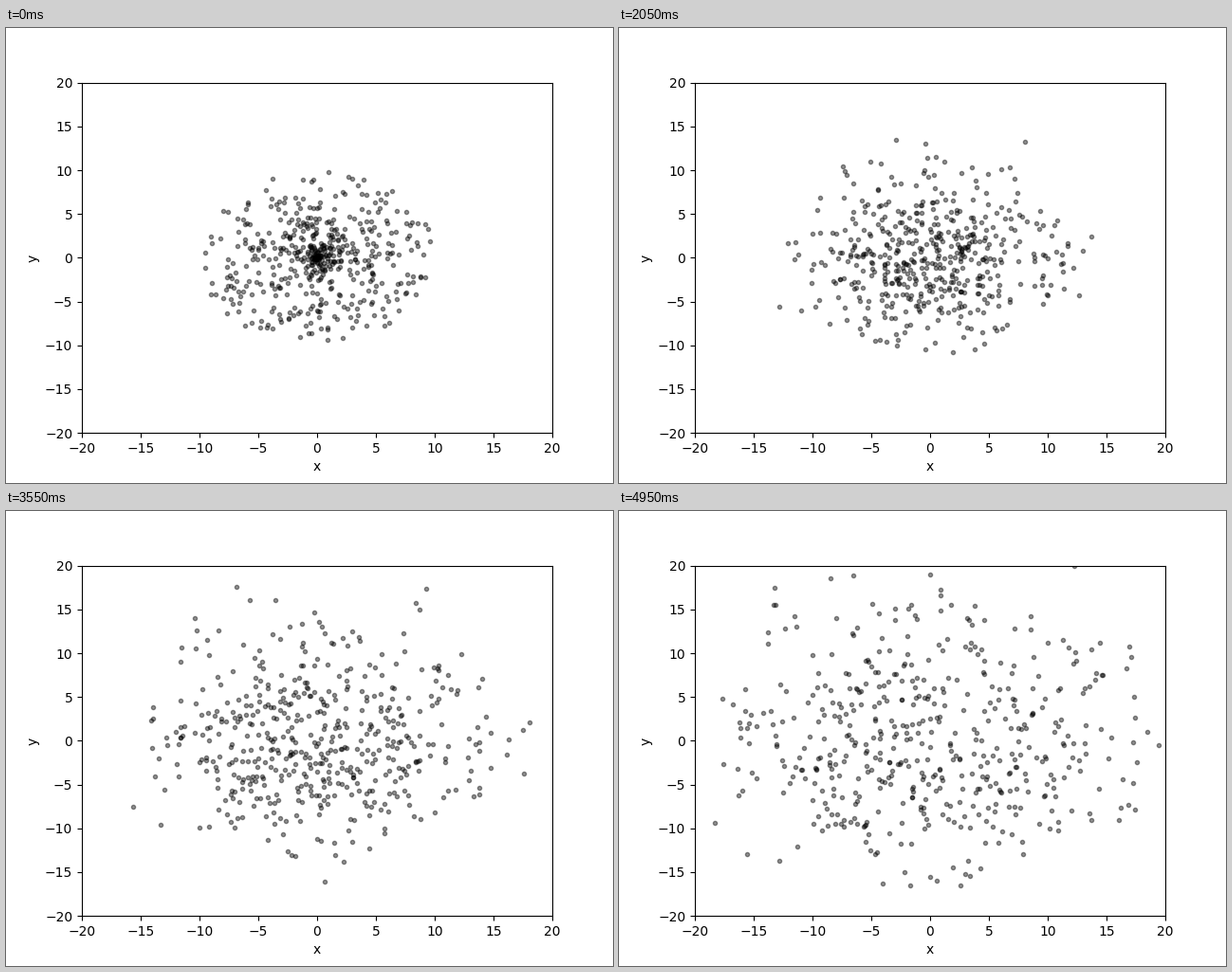
Write a matplotlib script that moves like this. It is 640x480 px and loops after 5000 ms.

```python
import numpy as np
import matplotlib.pyplot as plt
from matplotlib.animation import FuncAnimation

FRAMES, INTERVAL = 100, 50
COUNT, RADIUS, LIMIT = 500, 10, 20
SPEED = 1.17  # Maxwell scale, units per second

rng = np.random.default_rng(7)


def scatter_around(lengths):
    """Vectors of the given lengths in random directions."""
    angle = rng.uniform(0, 2 * np.pi, len(lengths))
    return np.column_stack([lengths * np.cos(angle), lengths * np.sin(angle)])


# A disc, dense at the centre, whose particles fly off in straight lines
start = scatter_around(RADIUS * rng.random(COUNT) ** 1.15)
speed = SPEED * np.linalg.norm(rng.normal(size=(COUNT, 3)), axis=1)
velocity = scatter_around(speed)

fig, ax = plt.subplots(figsize=(6.4, 4.8), dpi=100)
ax.set(xlim=(-LIMIT, LIMIT), ylim=(-LIMIT, LIMIT), xlabel="x", ylabel="y")
dots, = ax.plot([], [], "k.", alpha=0.42)


def update(frame):
    seconds = frame * INTERVAL / 1000
    dots.set_data(*(start + velocity * seconds).T)
    return dots,


anim = FuncAnimation(fig, update, frames=FRAMES, interval=INTERVAL,
                     repeat=True, repeat_delay=0)
plt.show()
```
